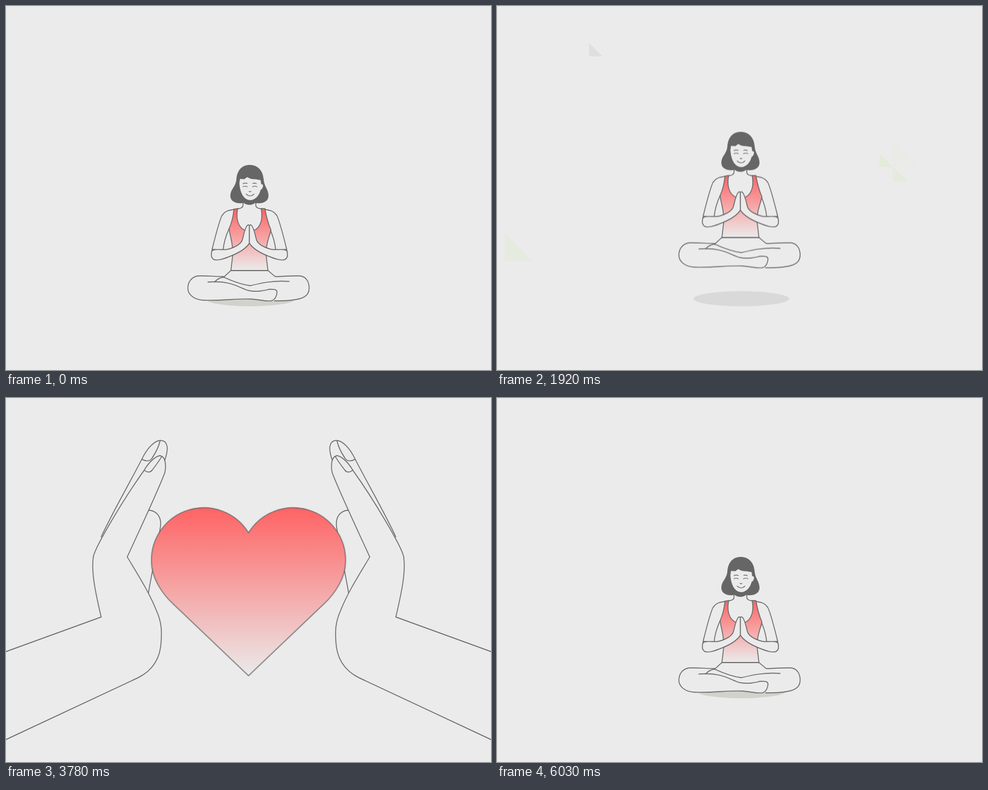
Write an HTML page that moves like this. It is 800 px wide and 600 px high and loops after 6060 ms.

```html
<!DOCTYPE html>
<html lang="en">
<head>
<meta charset="utf-8">
<title>Breathe</title>
<style>
html, body { margin: 0; width: 100%; height: 100%; overflow: hidden; background: #ebebeb; }
svg { display: block; width: 100vw; height: 100vh; }
svg * { animation: 6060ms cubic-bezier(.37, 0, .63, 1) infinite; }
.line { fill: #ebebeb; stroke: #666; stroke-width: 1.4; stroke-linejoin: round; stroke-linecap: round; }
.skin { fill: #ebebeb; }
.open { fill: none; }
.fine { stroke-width: 1.1; }
.top { fill: url(#red); }

/* Seated figure */
.woman { animation-name: woman; animation-timing-function: linear; }
@keyframes woman {
  0%, 32% { opacity: 1; }
  37%, 94.06% { opacity: 0; }
  99.5%, 100% { opacity: 1; }
}
.lift { animation-name: lift; }
@keyframes lift {
  0% { transform: none; animation-timing-function: cubic-bezier(.33, 0, .6, 1); }
  17.5% { transform: translateY(-58px); }
  22.8% { transform: translateY(-51px); }
  30%, 60% { transform: translateY(-54.5px); }
  60.01%, 100% { transform: none; }
}
.leg-l { transform-origin: 372px 440px; animation-name: leg-l; }
.leg-r { transform-origin: 431px 440px; animation-name: leg-r; }
@keyframes leg-l {
  0%, 30%, 100% { transform: rotate(0deg); }
  8% { transform: rotate(-6deg); }
  18.3% { transform: rotate(2.7deg); }
  23% { transform: rotate(-1deg); }
}
@keyframes leg-r {
  0%, 30%, 100% { transform: rotate(0deg); }
  8% { transform: rotate(6deg); }
  18.3% { transform: rotate(-2.3deg); }
  23% { transform: rotate(1deg); }
}
.shadow { transform-origin: 403px 482.5px; animation-name: shadow; }
@keyframes shadow {
  0%, 60.01%, 100% { fill: #d0d2cc; transform: scaleX(.95); }
  15%, 60% { fill: #d9d9d9; transform: none; }
}

/* Drifting triangles */
.drift { animation-name: drift, glow; animation-timing-function: linear; }
.slow { animation-name: drift-slow, glow; }
@keyframes drift {
  0%, 7% { transform: translate(25px, -25px); }
  18.3% { transform: none; animation-timing-function: cubic-bezier(.2, .6, .5, 1); }
  31.7% { transform: translate(-9px, 9.5px); }
  38%, 100% { transform: translate(-10px, 11px); }
}
@keyframes drift-slow {
  0%, 7% { transform: translate(17px, -17px); }
  18.3% { transform: none; animation-timing-function: cubic-bezier(.2, .6, .5, 1); }
  31.7% { transform: translate(-6px, 7px); }
  38%, 100% { transform: translate(-7px, 8px); }
}
@keyframes glow {
  0%, 8% { opacity: 0; }
  16%, 20% { opacity: 1; }
  31.7% { opacity: .45; }
  36%, 100% { opacity: 0; }
}

/* Heart */
.heart { fill: url(#red); vector-effect: non-scaling-stroke; transform-origin: 400.5px 319.5px; animation-name: grow, heart; }
@keyframes grow {
  0%, 42.57% { transform: translate(1px, 2.5px) scale(.184); }
  62.38% { transform: translate(-.5px, .5px) scale(.877); animation-timing-function: ease-out; }
  72.8%, 73.3%, 79.7%, 80.2%, 89.1%, 100% { transform: translate(0, 0) scale(1); }
  76%, 84% { transform: translate(0, -3px) scale(1.045); }
}
@keyframes heart {
  0%, 32% { opacity: 0; }
  37%, 94.06% { opacity: 1; animation-timing-function: linear; }
  99.5%, 100% { opacity: 0; }
}

/* Hands */
.swing { transform-origin: -200px 640px; animation-name: swing; }
@keyframes swing {
  0%, 33% { transform: rotate(-45deg) translate(0); animation-timing-function: ease-out; }
  42.57% { transform: rotate(0deg) translate(0); }
  47% { transform: rotate(0deg) translate(18px); }
  53%, 62.6% { transform: rotate(0deg) translate(0); animation-timing-function: ease-in; }
  72%, 100% { transform: rotate(-45deg) translate(0); }
}
/* The right fingers lean in a little before both hands bend */
#mirror .fingers { transform-origin: 190px 264px; animation-name: lean; }
@keyframes lean {
  0%, 42.57% { transform: rotate(2.5deg); }
  62.38%, 100% { transform: rotate(0deg); }
}
.thumb { animation-name: thumb; }
@keyframes thumb {
  0%, 42.57% { d: path("M222 243C230 210 236 190 246 190C260 191 267 201 266 213C263 245 255 290 249 323"); }
  62.38%, 100% { d: path("M223 210C226 194 232 185 237 185C250 187 256 197 255 210C251 240 240 290 235 321"); }
}
.ring { animation-name: ring; }
@keyframes ring {
  0%, 42.57% { d: path("M255 82C260 95 256 115 248 145C240 180 228 220 221 246"); }
  62.38%, 100% { d: path("M250 90C252 100 248 115 240 140C225 180 210 220 203 240"); }
}
.middle { animation-name: middle; }
@keyframes middle {
  0%, 42.57% { d: path("M205 190C208 160 215 125 221 100C226 80 234 69 244 69C256 70 257 84 253 105C245 155 232 205 222 245"); }
  62.38%, 100% { d: path("M157 229C175 190 205 138 224 101C233 82 246 69 256 70C268 71 268 85 262 102C250 140 220 200 205 240"); }
}
.middle-nail { animation-name: middle-nail; }
@keyframes middle-nail {
  0%, 42.57% { d: path("M221 97C226 101 230 101 233 100C238 92 239 82 238 71"); }
  62.38%, 100% { d: path("M224 101C232 105 238 104 241 99C247 90 252 80 254 71"); }
}
.index { animation-name: index; }
@keyframes index {
  0%, 42.57% { d: path("M163 262C172 225 187 200 208 124C211 108 216 96 225 96C240 97 240 115 238 145C235 185 225 235 217 266"); }
  62.38%, 100% { d: path("M144 262C147 245 195 165 228 119C236 105 247 96 254 95C262 96 265 108 262 123C250 155 220 218 200 262"); }
}
.index-nail { animation-name: index-nail; }
@keyframes index-nail {
  0%, 42.57% { d: path("M208 124C210 126 213 126 215 125C220 122 219 105 224 96"); }
  62.38%, 100% { d: path("M228 119C233 123 238 123 241 119C248 110 252 105 257 96"); }
}
.palm { animation-name: palm; }
@keyframes palm {
  0%, 42.57% { d: path("M163 262C158 280 162 310 174 361L0 422L-300 531V699L0 564L233 459C252 448 267 430 269 400C270 385 270 370 262 350C250 320 235 295 217 266"); }
  62.38%, 100% { d: path("M144 262C141 285 145 310 157 361L0 418L-300 528V703L0 563L218 461C240 450 255 430 256 400C257 385 257 370 248 350C236 320 218 292 200 262"); }
}
</style>
</head>
<body>
<svg viewBox="0 0 800 600">
  <defs>
    <linearGradient id="red" x2="0" y2="1">
      <stop offset="0" stop-color="#ff6465"/>
      <stop offset="1" stop-color="#ebebeb"/>
    </linearGradient>
  </defs>

  <g class="drift">
    <path fill="#dfebd0" d="M22 365v45h44z"/>
    <path fill="#e8ebe2" d="M662 212v44h44z"/>
    <path fill="#dcebc8" d="M640 234v22h22zM662 256v23h23z"/>
  </g>
  <path class="drift slow" fill="#d2d2d2" d="M158 54v22h22z"/>

  <g class="woman">
    <ellipse class="shadow" cx="403" cy="482.5" rx="79" ry="12.5"/>
    <g class="lift">
      <path class="skin" d="M371 436L359 447L403 476L444 446L432 436z"/>
      <path class="line open" d="M359 447L371 436H432L444 446"/>
      <g class="leg-r">
        <path class="skin" d="M444 446L443 486L400 480L403 461z"/>
        <path class="line" d="M444 446C460 446 475 444 486 445C497 447 500 457 500 465C500 478 490 483 470 485C460 486 450 486 443 486"/>
        <path class="line open" d="M467 454C440 452 420 457 403 461C385 459 370 452 359 447"/>
      </g>
      <g class="leg-l">
        <path class="line" d="M359 446C345 446 325 444 316 445C305 447 300 456 300 465C300 476 310 484 326 485C350 486 385 482 404 483C420 484 428 487 437 486C444 485 447 477 447 471C446 466 440 467 434 467C425 469 415 472 400 469C385 465 372 452 333 455"/>
        <path class="line open" d="M344 455Q350 448 359 447"/>
      </g>

      <!-- Hair, neck and shoulders -->
      <path fill="#666" d="M402 262C388 262 381 272 380 286C379 298 370 302 370 313C370 322 379 326 390 325Q402 331 413 325C424 326 433 322 433 313C433 302 426 298 425 286C424 272 416 262 402 262z"/>
      <g id="shoulder">
        <path class="skin" d="M391 324Q402 331 402 327V371L368 367L357 345Q361 338 384 334Q391 333 391 324z"/>
        <path class="line open" d="M391 324V328Q391 333 384 334C370 336 361 337 357 345"/>
        <path class="line" d="M357 344C352 352 344 385 340 401L358 403C359 392 362 380 368 367"/>
      </g>
      <use href="#shoulder" transform="matrix(-1 0 0 1 803 0)"/>
      <path class="line top" d="M376 335C375 345 373 356 368 367C369 378 375 392 374 410L371 436H432L429 410C428 392 435 380 437 369C431 356 429 345 427 334L421 334C425 356 417 371 402 371C386 371 378 356 382 334z"/>
      <g id="forearm">
        <path class="line" d="M340 402C337 412 339 416 343 418C350 420 358 417 366 414C385 407 397 398 401.5 391V362Q400 359 397 363C393 370 392 378 390 385C388 392 380 397 366 401C356 403 343 399 340 404"/>
      </g>
      <use href="#forearm" transform="matrix(-1 0 0 1 803 0)"/>

      <!-- Face -->
      <path class="skin" d="M386 285L393 285.5L398 282Q404 286 411 285.5L420 287L421 294Q424 293 424 297Q423 302 420 303C418 312 411 320 403 320C393 320 386 309 385 292z"/>
      <path class="line open fine" d="M391 293Q394 291 398 292.5M407 292.5Q410 291 413 293M391 298Q394.5 296 398 298M406.5 298Q410 296 414 298M401 305.5Q402.5 307 404 305.5M396 310Q403 316 409 310"/>
    </g>
  </g>

  <g class="swing">
    <path class="line thumb"/>
    <g class="fingers">
      <path class="line ring"/>
      <path class="line middle"/>
      <path class="line open middle-nail"/>
      <path class="line index"/>
      <path class="line open index-nail"/>
    </g>
    <path class="line palm"/>
  </g>
  <g id="mirror" transform="matrix(-1 0 0 1 800 0)"></g>

  <path class="line heart" d="M400.5 208A98.5 98.5 0 0 0 218 262C218 292 237 321 258 341L400.5 476.5L543 341C564 321 583 292 583 262A98.5 98.5 0 0 0 400.5 208z"/>
</svg>
<script>
document.getElementById('mirror').append(document.querySelector('.swing').cloneNode(true));
</script>
</body>
</html>
```
